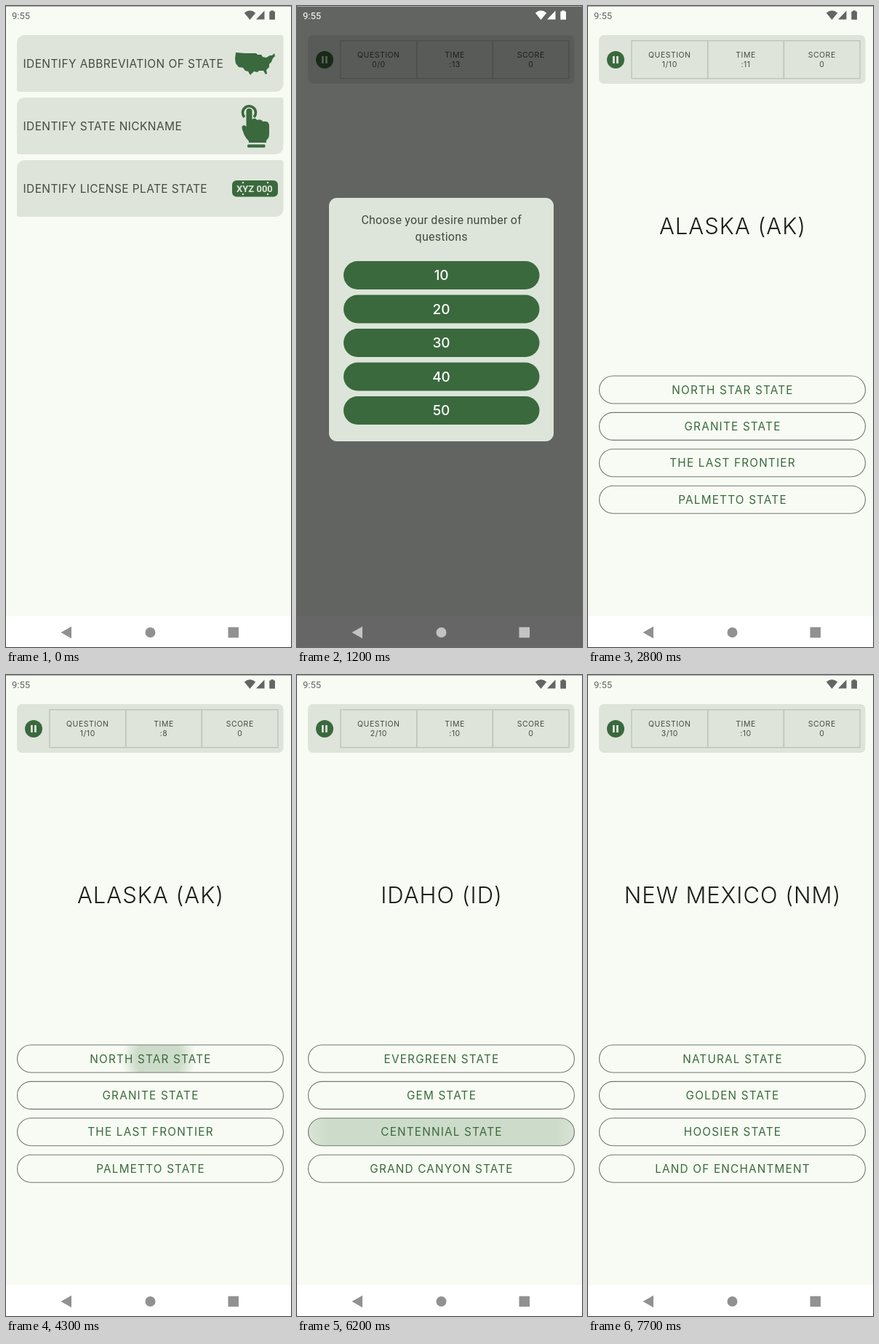
An HTML page for the animation above (8 s loop, 392 px wide and 882 px high).

```html
<!DOCTYPE html>
<html lang="en">
<head>
<meta charset="utf-8">
<title>State quiz</title>
<style>
  html, body { margin: 0; width: 100%; height: 100%; overflow: hidden; background: #f7fbf3; }
  svg { display: block; width: 100%; height: 100%; }
  text { font-family: Inter, sans-serif; fill: #454a43; }
  .mid { text-anchor: middle; }
  .menu { font-size: 15.5px; letter-spacing: .4px; }
  .stat { font-size: 10.5px; letter-spacing: .5px; }
  .question { font-size: 31px; font-weight: 300; letter-spacing: 1px; fill: #1a1c19; }
  .option { font-size: 15.3px; letter-spacing: 1.2px; fill: #3a693d; }
  .choice { font-size: 19px; font-weight: 500; fill: #fff; }
  .prompt { font: 16px Roboto, sans-serif; letter-spacing: .25px; fill: #42493f; }
  .plate { font: bold 13px Roboto, sans-serif; fill: #dee4da; }
  .clock { font: 13px Roboto, sans-serif; fill: inherit; }
  .card { fill: #dee4da; }
  .green { fill: #3a693d; }
</style>
</head>
<body>
<svg id="stage" viewBox="0 0 392 882" preserveAspectRatio="none"></svg>
<script>
const LOOP = 8000;
const TICK = 500;

// Each screen starts at `at`; its countdown drops by one from `firstTick` on.
const screens = [
  { at: 0, count: '0/0', title: '\u00a0()', options: [], firstTick: Infinity },
  { at: 1550, count: '1/10', title: 'ALASKA (AK)', firstTick: 2100,
    options: ['NORTH STAR STATE', 'GRANITE STATE', 'THE LAST FRONTIER', 'PALMETTO STATE'] },
  { at: 4700, count: '2/10', title: 'IDAHO (ID)', firstTick: 4900,
    options: ['EVERGREEN STATE', 'GEM STATE', 'CENTENNIAL STATE', 'GRAND CANYON STATE'] },
  { at: 6500, count: '3/10', title: 'NEW MEXICO (NM)', firstTick: 6700,
    options: ['NATURAL STATE', 'GOLDEN STATE', 'HOOSIER STATE', 'LAND OF ENCHANTMENT'] },
];
const taps = [
  { at: 4278, row: 0, x: 210, end: 4700 },
  { at: 6035, row: 2, x: 200, end: 6500 },
];

const text = (cls, x, y, value = '', id = '') =>
  `<text class="${cls}" x="${x}" y="${y}"${id && ` id="${id}"`}>${value}</text>`;
const rect = (x, y, w, h, attrs = '') =>
  `<rect x="${x}" y="${y}" width="${w}" height="${h}" ${attrs}/>`;
const optionY = row => 509 + row * 50.4;

const menuCard = (label, i) => {
  const y = 40 + i * 86;
  return `<path class="card" d="M15 ${y + 12}q0-12 12-12h351.500q3 0 3 3v63q0 12-12 12h-351.500q-3 0-3-3z"/>` +
    (i === 1 ? rect(15, y, 366.5, 78, 'id="press"') : '') +
    text('menu', 23.5, y + 45, label);
};

const icons = `
  <path class="green" d="M316 64l13 1 15 0 2 2 5 0 2 3 5 1 5-3 3 0 3-3 1 4-3 3-2 5-3 3 0 4-4 4
    1 5-2 1-3-5-6 0-2 2-5-1-4 4-1 1-3-5-4-1-3-4-6-1-4-5-1-6z"/>
  <path d="M328 153a9 9 0 1 1 13 0" fill="none" stroke="#3a693d" stroke-width="3.6"/>
  <path class="green" d="M330.500 145a4 4 0 0 1 8 0V156q4-3 7 1 5-2 8 2 8-1 8.500 5V176q0 6-4 9V188
    H334V186q-4-4-6-8L325 170q-2-6 3-6l2.500 2z"/>
  ${rect(332, 190.5, 24.5, 4.3, 'rx="1.500" class="green"')}
  ${rect(311, 240, 63, 22.5, 'rx="6" class="green"')}
  ${text('plate', 317, 256, 'XYZ 000')}
  <g class="card">${[[326, 243], [360, 243], [326, 259], [360, 259]]
    .map(([x, y]) => `<circle cx="${x}" cy="${y}" r="1.200"/>`).join('')}</g>`;

const statCell = (label, i) => {
  const x = 60 + i * 104.7, mid = x + 52.3;
  return rect(x, 47.7, 104.7, 52, 'fill="none" stroke="#bdc4ba" stroke-width="1.400"') +
    text('stat mid', mid, 71, label) + text('stat mid', mid, 84, '0', 'stat' + i);
};

const option = row =>
  rect(15.5, optionY(row), 366, 38, 'rx="19" fill="none" stroke="#72796f" stroke-width="1.100"') +
  text('option mid', 199, optionY(row) + 24.5, '', 'option' + row);

const choice = (label, i) =>
  rect(64, 351 + i * 46.5, 269.5, 39, 'rx="19.500" class="green"') +
  text('choice mid', 198.5, 377.4 + i * 46.5, label);

const pageFill = rect(0, 0, 392, 882, 'fill="#f7fbf3"') + rect(0, 839, 392, 43, 'fill="#fff"');

document.getElementById('stage').innerHTML = `
  <defs>
    <radialGradient id="glow">
      <stop offset=".6" stop-color="#cddbca"/>
      <stop offset="1" stop-color="#cddbca" stop-opacity="0"/>
    </radialGradient>
    <clipPath id="pill">${rect(15.5, 509, 366, 38, 'rx="19" id="pillShape"')}</clipPath>
  </defs>
  <g id="menu">${pageFill}
    ${['IDENTIFY ABBREVIATION OF STATE', 'IDENTIFY STATE NICKNAME', 'IDENTIFY LICENSE PLATE STATE']
      .map(menuCard).join('')}
    ${icons}
  </g>
  <g id="quiz">${pageFill}
    ${rect(15, 40, 366.5, 67, 'rx="7" class="card"')}
    <circle class="green" cx="38" cy="74" r="12"/>
    ${rect(34, 69, 2.8, 10, 'class="card"')}${rect(39, 69, 2.8, 10, 'class="card"')}
    ${['QUESTION', 'TIME', 'SCORE'].map(statCell).join('')}
    ${text('question mid', 199, 314, '', 'title')}
    <g clip-path="url(#pill)"><circle id="ripple" fill="url(#glow)"/></g>
    <g id="options">${[0, 1, 2, 3].map(option).join('')}</g>
  </g>
  ${rect(0, 0, 392, 882, 'id="scrim"')}
  <g id="dialog">
    ${rect(44, 264, 309, 335, 'rx="11" fill="#dde5da"')}
    ${text('prompt mid', 198.7, 300, 'Choose your desire number of')}
    ${text('prompt mid', 198.7, 323, 'questions')}
    ${[10, 20, 30, 40, 50].map(choice).join('')}
  </g>
  <g id="status">
    ${text('clock', 8, 17.5, '9:55')}
    <path d="M335.500 19l-7.700-9.500q7.700-6.500 15.400 0z"/>
    <path d="M344 18.500h11.500v-12z"/>
    <path d="M364.300 6.200h3.700v1.300h2v11.300h-7.700v-11.300h2z"/>
  </g>
  <g id="nav">
    <path d="M75.500 862l14.500-8.200v16.400z"/>
    <circle cx="198.500" cy="862" r="7"/>
    ${rect(305.5, 854.7, 14.5, 14.5)}
  </g>
  ${rect(0, 0, 392, 1, 'fill="#a5a8a2"')}`;

const el = id => document.getElementById(id);
const set = (id, attrs) => {
  for (const key in attrs) el(id).setAttribute(key, attrs[key]);
};
const write = (id, value) => {
  if (el(id).textContent !== value) el(id).textContent = value;
};
const ramp = (t, from, to) => Math.min(1, Math.max(0, (t - from) / (to - from)));
const pulse = (t, in0, in1, out0, out1) => ramp(t, in0, in1) - ramp(t, out0, out1);
const grey = v => `rgb(${v},${v},${v})`;

function drawQuiz(t) {
  const screen = screens.filter(s => t >= s.at).pop();
  const ticks = t < screen.firstTick ? 0 : 1 + Math.floor((t - screen.firstTick) / TICK);
  write('stat0', screen.count);
  write('stat1', ':' + (13 - ticks));
  write('title', screen.title);
  set('options', { visibility: screen.options.length ? 'visible' : 'hidden' });
  screen.options.forEach((label, row) => write('option' + row, label));

  const tap = taps.find(p => t >= p.at && t < p.end);
  set('ripple', { visibility: tap ? 'visible' : 'hidden' });
  if (!tap) return;
  const age = t - tap.at;
  set('pillShape', { y: optionY(tap.row) });
  set('ripple', {
    cx: tap.x, cy: optionY(tap.row) + 19,
    r: 18 + Math.min(age, 260) * 1.45,
    opacity: 1 - ramp(age, 240, 420),
  });
}

function draw(t) {
  const shown = pulse(t, 520, 660, 1220, 1360);
  const rise = 19 * (1 - ramp(t, 520, 660));
  const light = pulse(t, 650, 800, 1250, 1480);
  set('press', { opacity: 0.145 * pulse(t, 200, 450, 750, 950) });
  set('quiz', { opacity: ramp(t, 1050, 1180) });
  set('scrim', { opacity: 0.6 * pulse(t, 545, 785, 1230, 1380) });
  set('dialog', { opacity: shown, transform: `translate(0 ${rise})` });
  set('status', { fill: grey(100 + 155 * light) });
  set('nav', { fill: grey(145 + 50 * light) });
  drawQuiz(t);
}

const start = performance.now();
function frame() {
  draw((performance.now() - start) % LOOP);
  requestAnimationFrame(frame);
}
frame();
</script>
</body>
</html>
```
